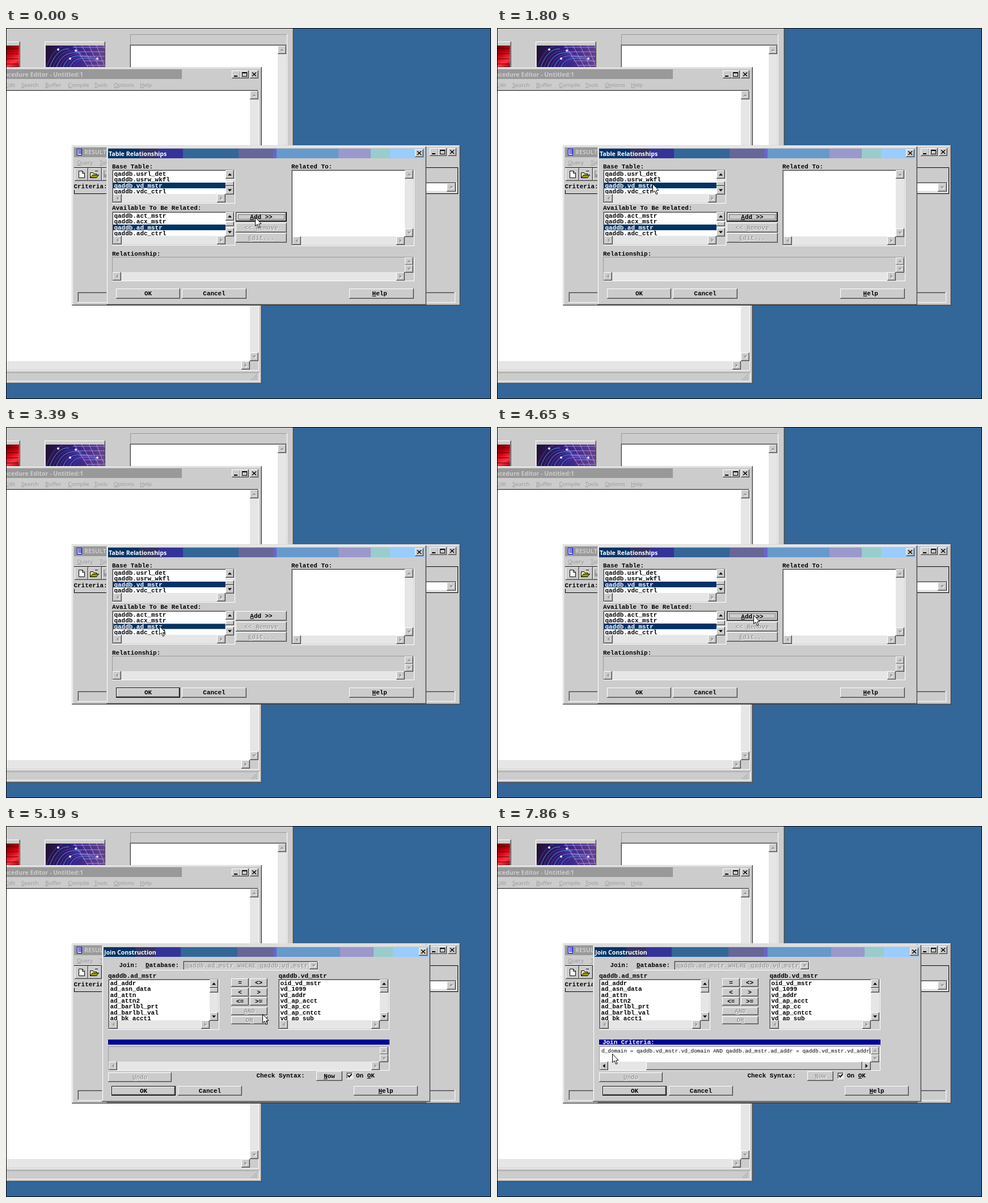
Write an HTML page with a canvas that moves like this. It is 855 by 655 pixels and loops after 8 s.

```html
<!DOCTYPE html>
<html lang="en">
<head>
<meta charset="utf-8">
<title>Table Relationships</title>
<style>
html, body { margin: 0; height: 100%; overflow: hidden; background: #369; }
canvas { display: block; }
</style>
</head>
<body>
<canvas id="stage" width="855" height="655"></canvas>
<script>
const c = document.getElementById('stage').getContext('2d');
const LOOP = 8000;
const FACE = '#ccc', GREY = '#999', DARK = '#444', TRACK = '#e6e6e6', NAVY = '#036';
const MONO = 'bold 10.93px "Liberation Mono", monospace';
const THIN = '9.38px "Liberation Mono", monospace';
const TITLE = 'bold 10.6px "Open Sans", sans-serif';
const MENU = '9.7px "Open Sans", sans-serif';

// Pointer stops: time, x, y
const path = [
  [0, 439, 334], [100, 466, 335], [210, 446, 335],
  [970, 443, 342], [1070, 424, 348], [1180, 385, 342], [1280, 340, 325],
  [1390, 308, 305], [1490, 288, 290], [1600, 276, 281], [1700, 273, 277],
  [1800, 274, 275], [1910, 272, 276], [2220, 271, 288], [2320, 270, 304],
  [2640, 270, 320], [2740, 270, 340], [2850, 270, 351], [3710, 292, 350],
  [3920, 330, 349], [4020, 375, 346], [4130, 420, 340], [4230, 450, 336],
  [4340, 463, 334], [4440, 452, 332], [5840, 450, 330], [5940, 410, 332],
  [6050, 340, 350], [6150, 275, 375], [6250, 238, 389], [6360, 214, 400], [6460, 203, 402]
];

function box(x, y, w, h, color) {
  c.fillStyle = color;
  c.fillRect(x, y, w, h);
}

function frame(x, y, w, h, color, dash = []) {
  c.strokeStyle = color;
  c.lineWidth = 1;
  c.setLineDash(dash);
  c.strokeRect(x + .5, y + .5, w - 1, h - 1);
  c.setLineDash([]);
}

function edges(x, y, w, h, light, dark) {
  box(x, y, w, 1, light);
  box(x, y, 1, h, light);
  box(x, y + h - 1, w, 1, dark);
  box(x + w - 1, y, 1, h, dark);
}

function raised(x, y, w, h) {
  box(x, y, w, h, FACE);
  edges(x + 1, y + 1, w - 2, h - 2, FACE, GREY);
  edges(x, y, w, h, '#fff', DARK);
}

function sunken(x, y, w, h, fill) {
  box(x, y, w, h, fill);
  edges(x + 1, y + 1, w - 2, h - 2, DARK, FACE);
  edges(x, y, w, h, GREY, '#fff');
}

function groove(x, y, w, h, fill) {
  box(x, y, w, h, fill);
  edges(x, y, w, h, GREY, '#fff');
}

function panel(x, y, w, h) {
  box(x, y, w, h, FACE);
  edges(x + 1, y + 1, w - 2, h - 2, '#fff', GREY);
  edges(x, y, w, h, FACE, DARK);
}

function poly(points, fill, stroke) {
  c.beginPath();
  points.forEach(([x, y]) => c.lineTo(x, y));
  c.closePath();
  if (fill) { c.fillStyle = fill; c.fill(); }
  if (stroke) { c.strokeStyle = stroke; c.lineWidth = 1; c.stroke(); }
}

function clipped(x, y, w, h, draw) {
  c.save();
  c.beginPath();
  c.rect(x, y, w, h);
  c.clip();
  draw();
  c.restore();
}

// An "&" underlines the letter after it
function text(s, x, y, color = '#000', font = MONO) {
  const key = s.indexOf('&');
  s = s.replace('&', '');
  c.font = font;
  c.fillStyle = color;
  c.fillText(s, x, y);
  if (key >= 0) {
    const left = c.measureText(s.slice(0, key)).width;
    c.fillRect(x + left, y + 1, c.measureText(s[key]).width, 1);
  }
}

function etched(s, x, y) {
  text(s, x + 1, y + 1, '#fff');
  text(s, x, y, GREY);
}

function button(s, x, y, w, h, { on = true, main = false, focus = false, down = false } = {}) {
  raised(x, y, w, h);
  if (down) {
    box(x, y, w, h, FACE);
    frame(x + 1, y + 1, w - 2, h - 2, GREY);
  } else if (main) {
    raised(x + 1, y + 1, w - 2, h - 2);
  }
  if (main) frame(x, y, w, h, '#000');
  if (focus) frame(x + 4, y + 4, w - 8, h - 8, '#333', [1, 1]);
  c.font = MONO;
  const tx = x + (w - c.measureText(s.replace('&', '')).width) / 2;
  (on ? text : etched)(s, tx, Math.floor(y + h / 2 + 3.5) + (down ? 1 : 0));
}

function arrow(x, y, w, h, dir, on) {
  raised(x, y, w, h);
  const draw = (d, color) => {
    c.save();
    c.translate(x + w / 2 + d, y + h / 2 + d);
    c.rotate(dir * Math.PI / 2);
    poly([[-3.5, 2], [0, -2], [3.5, 2]], color);
    c.restore();
  };
  if (!on) draw(1, '#fff');
  draw(0, on ? '#000' : GREY);
}

function vBar(x, y, h, on, thumb, size = 15) {
  box(x, y, 15, h, TRACK);
  arrow(x, y, 15, size, 0, on);
  arrow(x, y + h - size, 15, size, 2, on);
  if (thumb) raised(x, thumb, 15, 8);
}

function hBar(x, y, w, on = false) {
  box(x, y, w, 15, TRACK);
  arrow(x, y, 15, 15, 3, on);
  arrow(x + w - 15, y, 15, 15, 1, on);
}

function list(x, y, w, h, rows, { fill = '#fff', thumb, pick = -1, focus = false, on = true } = {}) {
  sunken(x, y, w, h, fill);
  const iw = w - 17, ih = h - 17;
  clipped(x + 2, y + 2, iw - 2, ih - 1, () => rows.forEach((s, i) => {
    const ty = Math.round(y + 11 + i * 10.35);
    if (i === pick) {
      box(x + 2, ty - 9, iw - 1, 10, NAVY);
      if (focus) frame(x + 2, ty - 9, iw - 2, 10, '#fc9', [1, 1]);
    }
    text(s, x + 3.5, ty, i === pick ? '#fff' : '#000');
  }));
  box(x + iw, y + ih, 16, 16, FACE);
  vBar(x + iw, y + 1, ih, on, thumb);
  hBar(x + 2, y + ih, iw - 2);
}

function memo(x, y, w, fill) {
  groove(x, y, w, 43, fill);
  box(x + w - 17, y + 27, 16, 15, FACE);
  vBar(x + w - 17, y + 1, 27, false, 0, 13.5);
  hBar(x + 1, y + 27, w - 18);
}

function closeBox(x, y) {
  raised(x, y, 15, 14);
  c.strokeStyle = '#000';
  c.lineWidth = 1.5;
  c.beginPath();
  c.moveTo(x + 4, y + 3.5); c.lineTo(x + 11, y + 10);
  c.moveTo(x + 11, y + 3.5); c.lineTo(x + 4, y + 10);
  c.stroke();
}

function windowButtons(x, y) {
  raised(x, y, 16, 14);
  box(x + 4, y + 9, 6, 2, '#000');
  raised(x + 15, y, 15, 14);
  frame(x + 18, y + 3, 9, 8, '#000');
  box(x + 18, y + 3, 9, 2, '#000');
  closeBox(x + 32, y);
}

function dialog(title, x, y, w, h) {
  panel(x, y, w, h);
  const stops = [0, .098, .158, .237, .412, .521, .532, .728, .83, .89, 1];
  const tones = [NAVY, '#336', '#339', '#369', '#669', '#66c', '#69c', '#99c', '#9cc', '#9cf'];
  const at = i => Math.round(x + 3 + (w - 6) * stops[i]);
  tones.forEach((tone, i) => box(at(i), y + 4, at(i + 1) - at(i), 17, tone));
  text(title, x + 4, y + 17, '#fff', TITLE);
  closeBox(x + w - 20, y + 5);
}

function pictures() {
  const red = c.createLinearGradient(0, 30, 24, 70);
  red.addColorStop(0, '#500');
  red.addColorStop(.4, '#c01');
  red.addColorStop(.7, '#f34');
  red.addColorStop(1, '#801');
  raised(-5, 24, 30, 60);
  box(0, 31, 23, 39, red);
  for (let i = 0; i < 4; i++) box(0, 36 + i * 9, 22, 1, '#600');
  raised(68, 24, 107, 60);
  clipped(70, 31, 104, 39, () => {
    const purple = c.createLinearGradient(70, 40, 174, 60);
    purple.addColorStop(0, '#213');
    purple.addColorStop(.5, '#328');
    purple.addColorStop(1, '#648');
    box(70, 31, 104, 39, purple);
    c.lineWidth = 1;
    for (let i = 0; i < 9; i++) {
      c.strokeStyle = i % 2 ? '#59d' : '#63b';
      c.beginPath();
      c.moveTo(70 + i * 6, 72);
      c.quadraticCurveTo(84 + i * 5, 34 + i, 100 + i * 11, 33 + i * 4);
      c.stroke();
    }
    c.strokeStyle = '#a8d';
    c.beginPath();
    for (let i = 0; i < 5; i++) {
      c.moveTo(120 + i * 13, 30); c.lineTo(145 + i * 10, 70);
      c.moveTo(118 + i * 6, 34 + i * 8); c.lineTo(174, 34 + i * 8);
    }
    c.stroke();
    c.fillStyle = '#def';
    for (const [x, y] of [[92, 38], [113, 54], [123, 40], [161, 54]]) {
      c.beginPath();
      c.arc(x, y, 2, 0, 7);
      c.fill();
    }
  });
}

function backWindow() {
  panel(-10, -20, 517, 320);
  pictures();
  groove(219, 11, 277, 19, FACE);
  sunken(218, 29, 278, 250, '#fff');
  vBar(479, 31, 240, false);
}

function editor() {
  panel(-10, 69, 461, 559);
  box(0, 73, 310, 17, GREY);
  c.textAlign = 'right';
  text('Procedure Editor - Untitled:1', 136, 86, FACE, TITLE);
  c.textAlign = 'left';
  windowButtons(398, 75);
  const items = { '&Edit': -1, '&Search': 27, '&Buffer': 69, '&Compile': 109.5, '&Tools': 155.5, '&Options': 190, '&Help': 236 };
  for (const s in items) text(s, items[s], 104, GREY, MENU);
  sunken(-5, 109, 451, 496, '#fff');
  box(430, 588, 15, 16, FACE);
  vBar(430, 111, 477, false);
  hBar(-30, 588, 460);
  groove(-5, 608, 452, 16, FACE);
  c.strokeStyle = GREY;
  c.lineWidth = 1;
  c.beginPath();
  for (let i = 3; i < 13; i += 4) { c.moveTo(443 - i, 622); c.lineTo(443, 622 - i); }
  c.stroke();
}

function results() {
  panel(116, 207, 685, 283);
  box(120, 211, 200, 17, GREY);
  box(125, 213, 9, 12, '#fff');
  frame(125, 213, 9, 12, '#00c');
  for (let y = 215; y < 223; y += 2) box(127, y, 6, 1, '#00c');
  text('RESULTS', 138, 223, FACE, TITLE);
  windowButtons(747, 212);
  text('&Query', 125, 241, GREY, MENU);
  text('&Table', 165, 241, GREY, MENU);
  box(120, 246, 677, 1, '#000');
  box(796, 246, 1, 47, '#000');
  for (let i = 0; i < 3; i++) raised(121 + i * 24, 247, 24, 23);
  poly([[128.5, 252.5], [134.5, 252.5], [138.5, 256.5], [138.5, 264.5], [128.5, 264.5]], '#fff', '#000');
  poly([[134.5, 252.5], [134.5, 256.5], [138.5, 256.5]], null, '#000');
  poly([[148.5, 264.5], [148.5, 255.5], [153.5, 255.5], [154.5, 257.5], [159.5, 257.5], [159.5, 264.5]], '#ff9', '#000');
  poly([[148.5, 264.5], [152.5, 259.5], [163.5, 259.5], [159.5, 264.5]], '#990', '#000');
  box(157, 252, 5, 1, '#000');
  box(172, 252, 10, 12, GREY);
  box(174, 253, 6, 5, FACE);
  text('Criteria:', 119.5, 283);
  sunken(190, 272, 605, 18, '#fff');
  arrow(777, 274, 16, 15, 2, false);
  box(120, 292, 677, 1, '#000');
  box(120, 286, 1, 7, '#000');
  sunken(126, 466, 666, 19, FACE);
}

function tables(t) {
  const addFocus = t < 2120 || t >= 4650;
  dialog('Table Relationships', 177, 209, 564, 280);
  text('Base Table:', 187, 248);
  list(187, 250, 217, 60, ['usrl_det', 'usrw_wkfl', 'vd_mstr', 'vdc_ctrl'].map(s => 'qaddb.' + s),
    { thumb: 271, pick: 2, focus: t >= 2120 && t < 3390 });
  text('Available To Be Related:', 187, 321);
  list(187, 324, 217, 60, ['act_mstr', 'acx_mstr', 'ad_mstr', 'adc_ctrl'].map(s => 'qaddb.' + s),
    { thumb: 342, pick: 2, focus: t >= 3390 && t < 4650 });
  button('&Add >>', 405, 325, 90, 17, { main: addFocus, focus: addFocus, down: t >= 4650 });
  button('<< &Remove', 405, 344, 90, 17, { on: false });
  button('&Edit...', 405, 362, 90, 17, { on: false });
  text('Related To:', 503, 248);
  list(503, 250, 217, 135, [], { on: false });
  text('Relationship:', 187, 402);
  memo(187, 404, 533, FACE);
  button('OK', 194, 460, 113, 18, { main: !addFocus });
  button('Cancel', 310, 460, 114, 18);
  button('&Help ', 605, 460, 114, 18);
}

function join(t) {
  const filled = t >= 5190, ready = t >= 5300, pasted = t >= 7860;
  const fill = filled ? '#fff' : FACE;
  dialog('Join Construction', 169, 210, 579, 277);
  text('Join:', 199.5, 249);
  text('&Database:', 246, 249);
  box(240, 254, 72, 1, '#fff');
  sunken(312, 238, 239, 17, FACE);
  etched('qaddb.ad_mstr WHERE qaddb.vd_mstr', 316, 250);
  arrow(535, 240, 15, 13, 2, false);

  if (filled) text('qaddb.ad_mstr', 180, 268);
  text('qaddb.vd_mstr', 480.5, 268);
  const left = ['addr', 'asn_data', 'attn', 'attn2', 'barlbl_prt', 'barlbl_val', 'bk_acct1'].map(s => 'ad_' + s);
  const right = ['oid_vd_mstr', ...['1099', 'addr', 'ap_acct', 'ap_cc', 'ap_cntct', 'ap_sub'].map(s => 'vd_' + s)];
  list(180, 270, 196, 90, filled ? left : [], { fill, thumb: 286 });
  list(480, 270, 196, 90, filled ? right : [], { fill, thumb: 286 });
  if (filled) {
    ['=', '<>', '<', '>', '<=', '>='].forEach((s, i) =>
      button(s, 397 + i % 2 * 33, Math.round(269 + (i >> 1) * 16.5), 31, 15));
    button('&AND', 397, 320, 64, 14, { on: false });
    button('O&R', 397, 336, 64, 14, { on: false });
  }

  box(180, 377, 496, 9, '#009');
  if (ready) text('Join Criteria:', 186, 385, '#fff');
  memo(180, 389, 496, ready ? '#fff' : FACE);
  if (pasted) {
    text('d_domain = qaddb.vd_mstr.vd_domain AND qaddb.ad_mstr.ad_addr = qaddb.vd_mstr.vd_addr', 184, 400, '#000', THIN);
    box(657, 391, 1, 11, '#000');
    hBar(181, 416, 478, true);
    raised(263, 416, 381, 15);
  } else if (ready && (t < 5840 || t >= 6250 && t < 6780 || t >= 7320)) {
    box(182, 391, 1, 11, '#000');
  }

  button('&Undo', 180, 435, 112, 17, { on: false });
  text('Check Syntax:', 441.5, 444);
  button('&Now', 547, 433, 46, 17, { on: !ready });
  sunken(600, 435, 12, 12, '#fff');
  c.strokeStyle = '#000';
  c.lineWidth = 2;
  c.beginPath();
  c.moveTo(603, 440); c.lineTo(605, 443); c.lineTo(609.5, 438);
  c.stroke();
  text('On &OK', 617, 444);
  button('OK', 186, 459, 113, 17, { main: true });
  button('Cancel', 303, 459, 113, 17);
  button('&Help', 613, 459, 113, 17);
}

function pointer(t) {
  const [, x, y] = path.findLast(p => p[0] <= t);
  c.save();
  c.translate(x + .5, y + .5);
  poly([[0, 0], [0, 15], [3.5, 12], [6, 18], [8.5, 17], [6, 11.5], [10.5, 11]], '#fff', '#000');
  c.restore();
}

function draw(now) {
  const t = now % LOOP;
  box(0, 0, 855, 655, '#369');
  backWindow();
  editor();
  results();
  tables(t);
  if (t >= 5100) join(t);
  pointer(t);
  frame(0, 0, 855, 655, '#000');
}

const start = performance.now();
function tick() {
  draw(performance.now() - start);
  requestAnimationFrame(tick);
}
tick();
</script>
</body>
</html>
```
